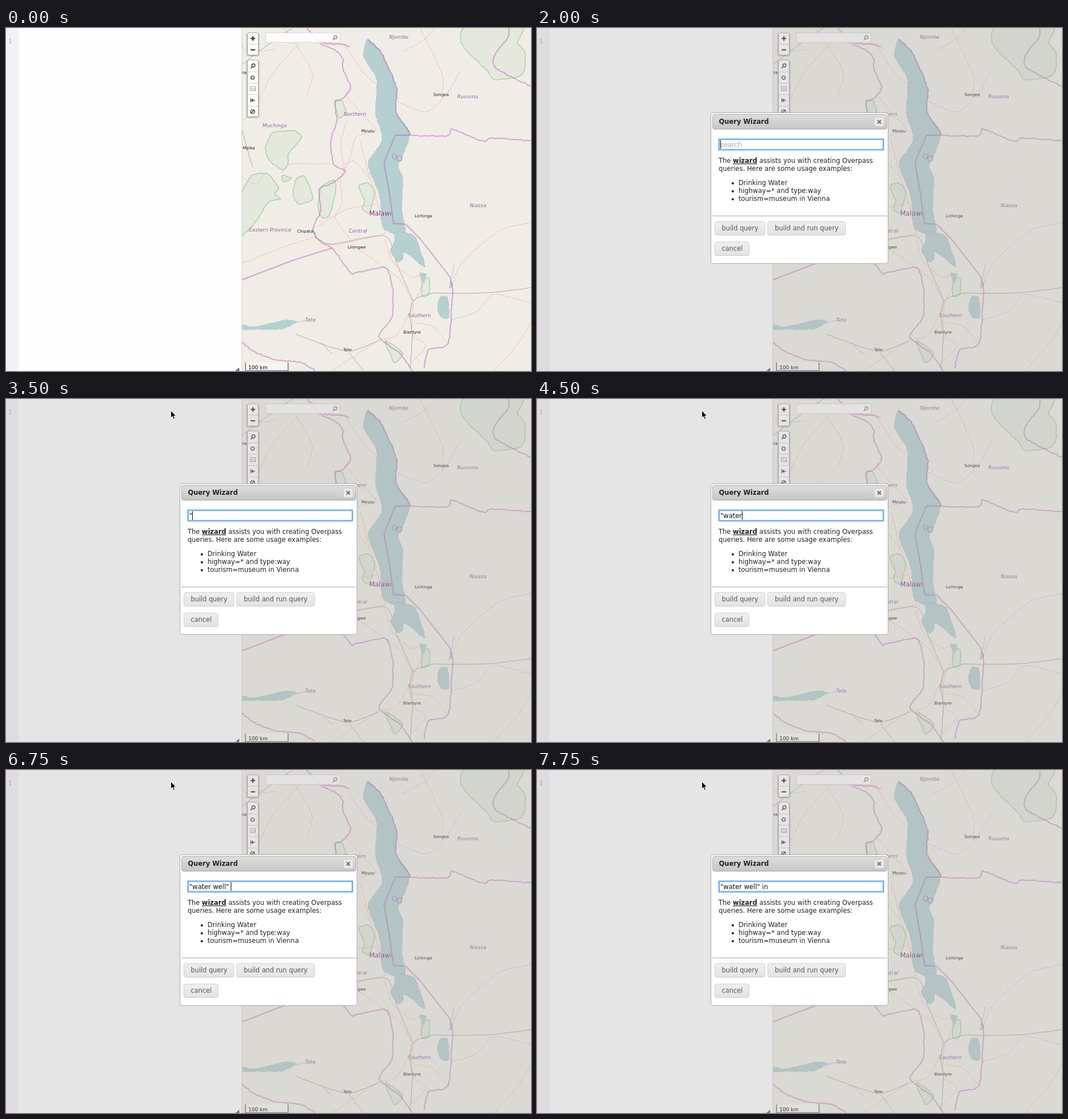
Animation, 925 px wide and 605 px high, one loop 8 s. Source, as an HTML page:

```html
<!DOCTYPE html>
<html lang="en">
<head>
<meta charset="utf-8">
<title>Query Wizard</title>
<style>
html, body { margin: 0; width: 100%; height: 100%; overflow: hidden; }
svg { display: block; width: 925px; height: 605px; }
text { font-family: "DejaVu Sans", Verdana, sans-serif; font-size: 11.5px; white-space: pre; }
#lines path { fill: none; stroke-linejoin: round; }
#lines .park { fill: #e4e8dd; stroke: #a5d0a2; stroke-width: 1.4; }
#lines .lake { fill: #b5d0d0; stroke: #a9a5c4; stroke-width: .8; stroke-dasharray: 3 2; }
#lines .pond { fill: #b5d0d0; }
#lines .river { stroke: #b5d0d0; stroke-width: 1.2; }
#lines .road { stroke: #f6b9a4; stroke-width: .9; }
#lines .rail { stroke: #8c8a88; stroke-width: .7; }
#lines .dash { stroke: #cfa9d2; stroke-width: .9; stroke-dasharray: 4 2; }
#lines .border { stroke: #b45ab9; stroke-opacity: .5; stroke-width: 1.9; }
#map text { paint-order: stroke; stroke: #fff; stroke-opacity: .5; stroke-width: 1.2px; }
.region text { font-size: 8.9px; font-style: italic; fill: #855b91; }
.town text { font-size: 7.3px; fill: #111; }
#map .country { font-size: 11.4px; fill: #73307b; }
.bar rect { fill: #fff; stroke: #aaa; }
.bar path, .bar circle { fill: none; stroke: #222; stroke-width: 1.2; }
.bar .rule { stroke: #ccc; stroke-width: 1; }
.bar .shade { stroke: #000; stroke-opacity: .2; stroke-width: 2; }
.btn rect { fill: url(#btn); stroke: #cfcfcf; }
.btn text { fill: #555; font-size: 11.4px; }
.bold { font-weight: bold; }
</style>
</head>
<body>
<svg viewBox="0 0 925 605">
  <defs>
    <linearGradient id="title" x2="0" y2="1"><stop stop-color="#dedede"/><stop offset="1" stop-color="#c6c6c6"/></linearGradient>
    <linearGradient id="btn" x2="0" y2="1"><stop stop-color="#efefef"/><stop offset="1" stop-color="#e3e3e3"/></linearGradient>
  </defs>

  <g id="map">
    <rect x="416" width="509" height="605" fill="#f0ede6"/>
    <g id="lines"></g>
    <g fill="#c5c8dc" stroke="#a586bd" stroke-width="1.2">
      <ellipse cx="684.500" cy="226.500" rx="3.500" ry="4.500"/><ellipse cx="693" cy="230" rx="4.500" ry="5"/>
    </g>
    <g class="region">
      <text x="675" y="19">Njombe</text><text x="795" y="124">Ruvuma</text>
      <text x="595" y="155">Northern</text><text x="452" y="175">Muchinga</text>
      <text x="817" y="315.500">Niassa</text><text x="428" y="359">Eastern Province</text>
      <text x="604" y="361">Central</text><text x="708" y="510">Southern</text>
      <text x="527" y="518">Tete</text>
    </g>
    <text class="country" x="640" y="331">Malawi</text>
    <g class="town">
      <text x="753" y="120">Songea</text><text x="626" y="184">Mzuzu</text>
      <text x="417" y="214">Mpika</text><text x="720" y="334">Lichinga</text>
      <text x="513" y="361">Chipata</text><text x="602" y="389">Lilongwe</text>
      <text x="700" y="539">Blantyre</text><text x="594" y="570">Tete</text>
      <text x="415" y="81">na</text>
    </g>
  </g>

  <g class="bar">
    <path class="shade" d="M424.500,10v36q0,3 3,3h15q3,0 3,-3v-36M424.500,58v97q0,3 3,3h15q3,0 3,-3v-97"/>
    <rect x="425.500" y="8.500" width="19" height="39" rx="3"/>
    <rect x="425.500" y="56.500" width="19" height="100" rx="3"/>
    <path class="rule" d="M426,28.500h18M426,77.500h18M426,97.500h18M426,117.500h18M426,137.500h18"/>
    <path d="M431,18.500h8M435,14.500v8M431,38.500h8" style="stroke-width:2"/>
    <circle cx="436" cy="66" r="2.800"/><path d="M434,68l-3,3"/>
    <circle cx="434.500" cy="87.500" r="3"/>
    <path class="rule" d="M430.500,103.500h9v7h-9zM432,109l2,-3 2,2 1,-1 2,2" style="stroke:#999"/>
    <path d="M431.500,124v7M439,127.500h-6M435.500,125l-2.500,2.500 2.500,2.500"/>
    <circle cx="434.500" cy="147.500" r="3.500"/><path d="M432,150l5,-5"/>
    <rect x="457.500" y="8.500" width="131" height="17" style="stroke:#d8d6d2;fill-opacity:.85"/>
    <g opacity=".6"><circle cx="580.500" cy="16.500" r="2.800"/><path d="M578.500,18.500l-3,3"/></g>
  </g>
  <path d="M422,590v14.500h75v-14.500" fill="#fff" fill-opacity=".5" stroke="#777" stroke-width="1.600"/>
  <text x="427" y="602" style="font-size:9px">100 km</text>

  <rect width="416" height="605" fill="#fefefe"/>
  <rect width="22" height="605" fill="#f4f1f5"/>
  <path d="M415.500,0v605" stroke="#d2d2d2"/>
  <path d="M411,599v6h-7z" fill="#666"/>
  <text x="4" y="27" style="font:10.5px 'DejaVu Sans Mono',monospace" fill="#aaa">1</text>

  <g id="modal">
    <rect width="925" height="605" fill="#aaa" opacity=".3"/>
    <rect x="306.500" y="149.500" width="312" height="266" rx="4" fill="#fff" stroke="#aaa"/>
    <rect x="309.500" y="152.500" width="307" height="26" rx="3.500" fill="url(#title)" stroke="#aaa"/>
    <text class="bold" x="320.500" y="169" fill="#222">Query Wizard</text>
    <rect x="594.500" y="157.500" width="17" height="16" rx="3" fill="#e9e9e9" stroke="#cfcfcf"/>
    <path d="M600,162.500l6,6m0,-6l-6,6" stroke="#777" stroke-width="2.400"/>
    <rect x="319.500" y="195" width="292" height="21" rx="2" fill="none" stroke="#bcdcfa" stroke-width="1.500"/>
    <rect x="321" y="196.500" width="289" height="18" fill="#fff" stroke="#62aaf0" stroke-width="2"/>
    <text id="entry" x="323" y="210"></text>
    <rect id="caret" y="198" width="1" height="15"/>
    <g fill="#222">
      <text x="320" y="238">The <tspan class="bold" text-decoration="underline">wizard</tspan> assists you with creating Overpass</text>
      <text x="320" y="252">queries. Here are some usage examples:</text>
      <text x="355" y="277">Drinking Water</text>
      <text x="355" y="291">highway=* and type:way</text>
      <text x="355" y="305">tourism=museum in Vienna</text>
      <circle cx="345" cy="274" r="2"/><circle cx="345" cy="288" r="2"/><circle cx="345" cy="302" r="2"/>
    </g>
    <path d="M309,331.500h308" stroke="#aaa"/>
    <g class="btn">
      <rect x="313.500" y="341.500" width="88" height="24" rx="3"/><text x="325.500" y="357">build query</text>
      <rect x="406.500" y="341.500" width="137" height="24" rx="3"/><text x="419" y="357">build and run query</text>
      <rect x="313.500" y="377.500" width="60" height="24" rx="3"/><text x="325.500" y="393">cancel</text>
    </g>
  </g>
  <path id="cursor" d="M.5,0V12.500L3.400,10 5.400,15 7.400,14 5.400,9.400H9.300Z" stroke="#fff" stroke-width=".8"/>
</svg>

<script>
const $ = id => document.getElementById(id);
let seed;
const rnd = () => (seed = seed * 16807 % 2147483647) / 2147483647 - .5;

// Smooth curve through key points, shaken by up to `wiggle` px every few px
function trace(keys, wiggle, closed) {
  seed = 77;
  const p = keys.split(' ').map(k => k.split(',').map(Number)), n = p.length;
  const pick = i => closed ? p[(i + n) % n] : p[Math.max(0, Math.min(n - 1, i))];
  const out = [];
  for (let i = 0; i < (closed ? n : n - 1); i++) {
    const [a, b, c, d] = [-1, 0, 1, 2].map(j => pick(i + j));
    const steps = Math.ceil(Math.hypot(c[0] - b[0], c[1] - b[1]) / 4);
    for (let s = 0; s < steps; s++) {
      const u = s / steps;
      out.push([0, 1].map(k => (b[k] + .35 * (u * (1 - u) ** 2 * (c[k] - a[k]) - u * u * (1 - u) * (d[k] - b[k]))
        + u * u * (3 - 2 * u) * (c[k] - b[k]) + (s ? 2 * wiggle * rnd() : 0)).toFixed(1)));
    }
  }
  return 'M' + out.join('L') + (closed ? 'Z' : 'L' + p[n - 1]);
}

const add = (cls, wiggle, closed, ...shapes) => $('lines').insertAdjacentHTML('beforeend',
  shapes.map(k => `<path class="${cls}" d="${wiggle ? trace(k, wiggle, closed) : 'M' + k}"/>`).join(''));
const eastShore = '637,20 660,41 679,80 689,112 687,148 711,185';

add('park', .8, true,
  '812,-3 803,28 850,78 860,91 905,85 914,70 914,42 901,25 910,-3',
  '470,185 507,181 521,193 498,222 497,240 488,250 465,235 457,212',
  '580,130 592,128 599,150 587,158',
  '432,262 460,256 481,282 473,292 484,302 463,307 437,345 412,366 412,300',
  '487,260 503,265 488,271',
  '511,268 526,262 541,300 517,311 506,295',
  '555,282 578,268 581,290 570,330 558,335 550,318',
  '622,280 638,273 650,290 640,327 628,318 632,305',
  '541,355 547,370',
  '735,445 746,442 745,470 733,472',
  '668,553 681,558 699,574 685,590');
add('road', .8, false,
  '416,165 440,140 470,80 520,25 554,28',
  '490,0 528,55 540,85 530,120',
  '572,30 597,31 632,82 652,98',
  '607,105 601,120 640,165 652,182 617,192 605,232 590,265 592,310 580,335 615,385',
  '601,165 590,200 597,253',
  '625,200 640,260 655,310 668,362',
  '655,310 600,320 550,350',
  '545,368 575,383 640,370 668,362',
  '615,385 690,440 715,480',
  '668,372 680,410 715,440 732,432',
  '416,415 480,390 545,368',
  '769,115 768,80 730,0',
  '730,430 730,460 690,540 655,552 575,605',
  '718,482 716,540 740,560 715,590',
  '720,520 750,525 779,556',
  '925,520 900,560 860,605');
add('rail', .4, false,
  '416,65 440,45 505,0',
  '416,180 427,220 435,245',
  '545,370 575,381 668,367 690,420 717,481',
  '925,458 850,467 785,468 750,468 717,481 712,510 716,540 712,600',
  '510,540 600,570 655,552');
add('lake', .8, true,
  eastShore + ' 699,225 691,243 699,265 697,320 704,362 688,364 664,350 658,295 638,240 663,197 651,150 653,92 630,50',
  '686,360 720,367 738,421 712,401 700,396 699,408 690,412 677,392 685,376');
add('pond', 1, true,
  '729,434 741,433 735,450',
  '764,476 778,474 781,510 770,512 760,498',
  '784,442 787,455 780,459',
  '410,522 440,526 490,515 512,518 488,531 440,532 410,532');
add('river', .6, false, '508,521 530,515', '790,418 785,443', '605,572 630,605', '555,555 575,575');
add('dash', .7, false,
  '416,32 430,43 475,37',
  '700,42 740,18 755,0',
  '690,130 740,148 775,120 800,75',
  '925,343 870,357 805,412 785,455',
  '783,515 830,500 860,470 925,485',
  '416,263 440,275 455,257',
  '487,256 500,240 577,240',
  '598,240 615,235 640,265');
add('border', 1, false,
  eastShore,
  '528,-3 555,27 579,38 594,55 593,70 607,105 592,125 579,132 583,165 573,195 577,240 598,253 577,272 552,285 555,322 540,356 555,378 575,389 607,432 618,431 668,422 678,445 682,470 679,512 657,545 693,573 716,605',
  '558,27 590,28 606,33',
  '416,554 440,572 480,586 520,590 545,605',
  '783,440 787,465 779,556 745,567 736,600',
  '711,189 778,190 784,178 810,188 842,200 855,194 925,199',
  '887,-3 885,15 863,45 862,70 925,103');
add('border', 0, false,
  '711,185 711,189 686,189 666,237 676,295 683,345 704,346 730,372 783,440',
  '575,388 505,410 416,444');

const phrase = '"water well" in ';
// [time, letters typed]
const keys = [[2000, 0], [3500, 1], [4000, 3], [4250, 4], [4500, 6], [5000, 7], [5250, 8],
  [5500, 10], [5750, 11], [6750, 13], [7000, 14], [7250, 16]];
const away = [0, -50];
const pointer = [[0, away], [500, [272, -11.5]], [750, away], [2250, [228, -12.5]], [2500, [290, 20.5]]];
const at = (rows, t) => rows.findLast(r => r[0] <= t);

function draw(now) {
  const t = now % 8000, key = at(keys, t);
  $('modal').style.display = key ? '' : 'none';
  if (key) {
    const [since, count] = key, entry = $('entry');
    entry.textContent = count ? phrase.slice(0, count) : 'search';
    entry.setAttribute('fill', count ? '#111' : '#a9a9a9');
    $('caret').setAttribute('x', Math.floor(323 + (count && entry.getComputedTextLength())));
    // The caret blinks every half second after the last key
    $('caret').setAttribute('opacity', 1 - Math.floor((t - since) / 500) % 2);
  }
  $('cursor').setAttribute('transform', `translate(${at(pointer, t)[1]})`);
}

const start = performance.now();
function loop() {
  draw(performance.now() - start);
  requestAnimationFrame(loop);
}
loop();
</script>
</body>
</html>
```
